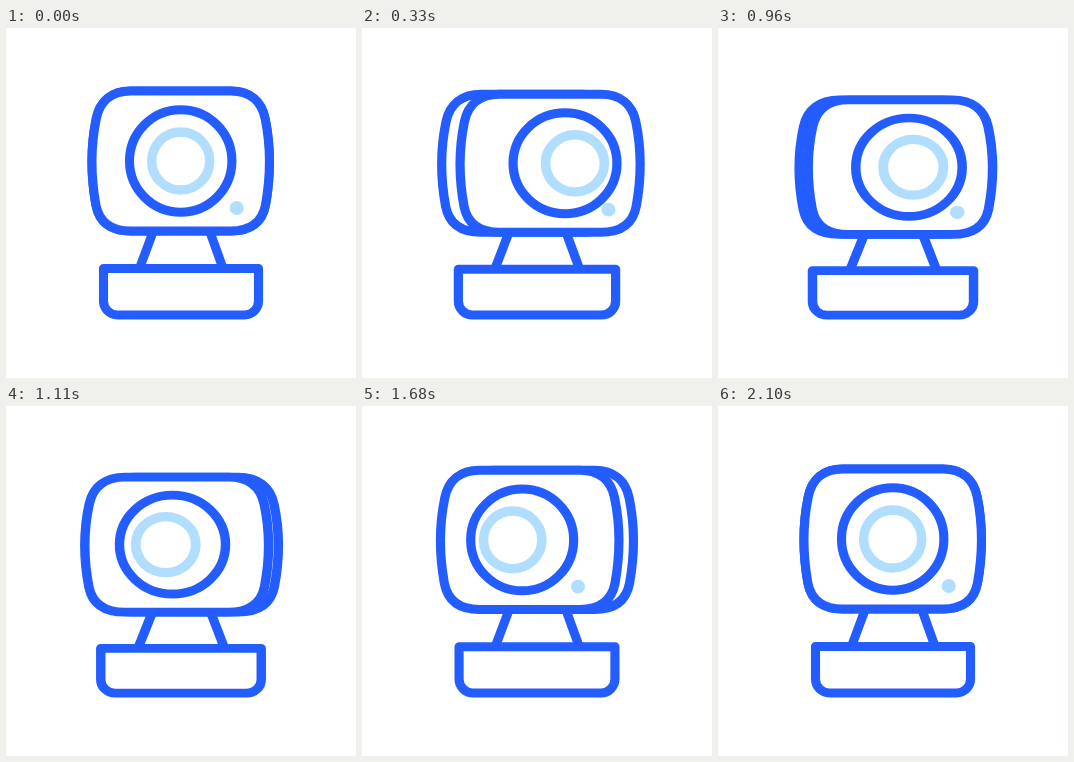
An HTML page that plays this animation: 350x350 px, repeating every 2.21 s.

```html
<!DOCTYPE html>
<html lang="en">
<head>
<meta charset="utf-8">
<title>Webcam</title>
<style>
  html, body { margin: 0; width: 100%; height: 100%; overflow: hidden; background: #fff; }
  svg { display: block; width: 100%; height: 100%; }
  .line { fill: #fff; stroke: #235dff; stroke-width: 9.1; stroke-linejoin: round; }
  .glow { fill: none; stroke: #b1deff; stroke-width: 9.5; }
  .dot { fill: #b1deff; }
</style>
</head>
<body>
<svg viewBox="0 0 350 350">
  <defs>
    <path id="shell" d="M-50-70H50C69-70 81-60 84.5-42C90.2-14 90.2 14 84.8 44C81.5 61 70 70 50 70H-50C-70 70-81.5 61-84.8 44C-90.2 14-90.2-14-84.5-42C-81-60-69-70-50-70Z"/>
  </defs>
  <g id="camera">
    <path class="line" d="M147 204L134 239M204 204L216.5 239"/>
    <path class="line" d="M97.5 240.5H252.5V273a14 14 0 0 1-14 14H111.5a14 14 0 0 1-14-14Z"/>
    <g transform="translate(174.7 133)">
      <use id="back" class="line" href="#shell"/>
      <use id="front" class="line" href="#shell"/>
      <circle id="dot" class="dot" cx="56" cy="47" r="7"/>
      <circle id="ring" class="line" r="51.2"/>
      <circle id="lens" class="glow" r="29"/>
    </g>
  </g>
</svg>
<script>
const LOOP = 2210;

// Horizontal shift of each layer when looking ahead, right and left
const shifts = {
  back: [0, -5, 7.5],
  front: [0, 13.5, -7],
  dot: [0, 15, -15],
  ring: [0, 28.5, -14.5],
  lens: [0, 38.5, -24]
};
const AHEAD = 0, RIGHT = 1, LEFT = 2;
const turns = [
  { start: 0, end: 400, from: AHEAD, to: RIGHT },
  { start: 700, end: 1320, from: RIGHT, to: LEFT },
  { start: 1635, end: 2100, from: LEFT, to: AHEAD }
];

const get = id => document.getElementById(id);
const clamp = x => Math.min(1, Math.max(0, x));
const smooth = x => x * x * (3 - 2 * x);
const easeInOut = x => x < 0.5 ? 4 * x ** 3 : 1 - 4 * (1 - x) ** 3;

function draw(now) {
  const t = now % LOOP;
  const turn = turns.findLast(item => t >= item.start);
  const k = clamp((t - turn.start) / (turn.end - turn.start));
  const p = easeInOut(k);

  for (const [id, pose] of Object.entries(shifts)) {
    const x = pose[turn.from] + (pose[turn.to] - pose[turn.from]) * p;
    get(id).setAttribute("transform", `translate(${x} 0)`);
  }

  // Squash towards the foot while turning
  const squash = 0.039 * smooth(clamp(2.4 * Math.min(k, 1 - k)));
  get("camera").setAttribute("transform",
    `translate(175 292) scale(${1 + squash} ${1 - squash}) translate(-175 -292)`);

  // The light goes out for 150 ms in every 450 ms
  const off = (t + 300) % 450 < 150;
  get("dot").setAttribute("visibility", off ? "hidden" : "visible");
}

function tick() {
  draw(performance.now());
  requestAnimationFrame(tick);
}
tick();
</script>
</body>
</html>
```
